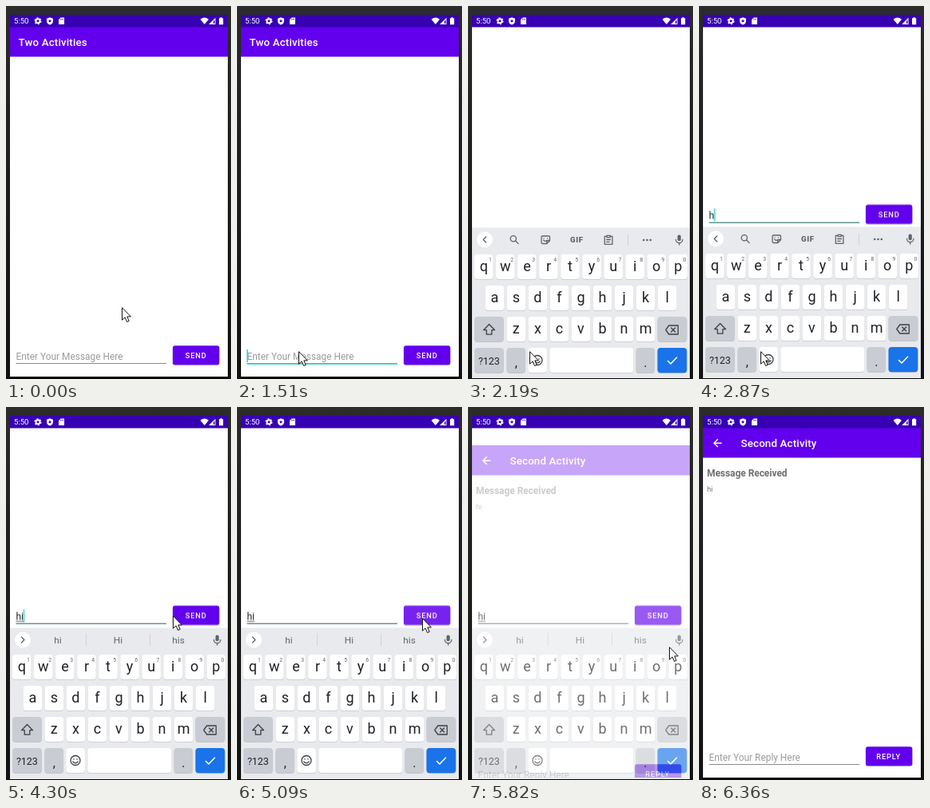
An HTML page for the animation above (8000 ms loop, 282x467 px).

```html
<!DOCTYPE html>
<html lang="en">
<head>
<meta charset="utf-8">
<title>Two Activities</title>
<style>
html, body { margin: 0; width: 100%; height: 100%; overflow: hidden; background: #1c1c1c; }
svg { display: block; width: 282px; height: 467px; font-family: Roboto, sans-serif; }
text { white-space: pre; }
.bar { fill: #6200ee; }
.title { font: 500 13.3px Roboto, sans-serif; letter-spacing: .166px; fill: #fff; }
.label { font: 500 9.3px Roboto, sans-serif; letter-spacing: .83px; fill: #fff; }
.entry { font-size: 11.9px; fill: #222; }
.hint { font-size: 11.9px; fill: #9b9b9b; }
.mid { text-anchor: middle; }
.icon { fill: none; stroke: #5f6368; stroke-width: 1.3; stroke-linecap: round; stroke-linejoin: round; }
.word { font-size: 11.8px; fill: #5f6368; text-anchor: middle; }
.split { stroke: #cfd2d6; }
.key { fill: #fff; }
.key.dim { fill: #c9ccd2; }
.key.go { fill: #1a73e8; }
.glyph { font-size: 18px; fill: #202124; text-anchor: middle; }
.digit { font-size: 6.8px; fill: #5f6368; text-anchor: middle; }

/* Hard steps; 1% of the loop is 80 ms. */
[data-run] { animation: 8s step-end -2ms infinite; }
#cursor { animation-name: cursor; }
#pan { animation-name: pan; }
#hint { animation-name: hint; }
#focus { animation-name: focus; }
#rest { animation-name: rest; }
#caret { animation-name: caret; }
#one { animation-name: one; }
#two { animation-name: two; }
#compose { animation-name: compose; }
#ripple { animation-name: ripple; }
#keyboard { animation-name: keyboard; }
#tools { animation-name: tools; }
#words { animation-name: words; }
#chevron { animation-name: chevron; transform-origin: 21px 291.5px; }
#second { animation-name: second; }

@keyframes cursor {
  0% { transform: translate(145px, 377px); }
  1.875% { transform: translate(-30px, 0); }
  5.25% { transform: translate(216px, 430px); }
  6.75% { transform: translate(86px, 427px); }
  8.625% { transform: translate(75px, 427px); }
  10.5% { transform: translate(74px, 430px); }
  12% { transform: translate(76px, 432px); }
  13.5% { transform: translate(77px, 432px); }
  50% { transform: translate(81px, 405px); }
  51.875% { transform: translate(104px, 349px); }
  53.75% { transform: translate(209px, 261px); }
  55.75% { transform: translate(236px, 252px); }
  57.25% { transform: translate(247px, 244px); }
  58.75% { transform: translate(240px, 258px); }
  60.25% { transform: translate(232px, 264px); }
  65.25% { transform: translate(228px, 274px); }
  67.125% { transform: translate(238px, 294px); }
  69% { transform: translate(246px, 380px); }
  70.75% { transform: translate(244px, 380px); }
  72.75% { transform: translate(252px, 300px); }
  74.375% { transform: translate(256px, 230px); }
  76.125% { transform: translate(255px, 192px); }
  77.875% { transform: translate(246px, 190px); }
  79.5%, 100% { transform: translate(-30px, 0); }
}
@keyframes pan {
  0% { transform: none; }
  25.5% { transform: translateY(-40px); }
  27.375% { transform: translateY(-110px); }
  30.5%, 100% { transform: translateY(-176.5px); }
}
@keyframes hint { 0% { opacity: 1; } 35.875%, 100% { opacity: 0; } }
@keyframes focus { 0% { opacity: 0; } 16.625% { opacity: 1; } 30.5%, 100% { opacity: 0; } }
@keyframes rest { 0% { stroke: #8c8c8c; } 30.5%, 100% { stroke: #62958f; } }
@keyframes caret {
  0% { opacity: 0; transform: none; }
  18.875% { opacity: 1; transform: none; }
  34% { opacity: 0; transform: none; }
  35.875% { opacity: 1; transform: translateX(6.6px); }
  37.375% { opacity: 1; transform: translateX(9.4px); }
  48.125% { opacity: 0; transform: translateX(9.4px); }
  53.75% { opacity: 1; transform: translateX(9.4px); }
  60.25%, 100% { opacity: 0; transform: translateX(9.4px); }
}
@keyframes one { 0% { opacity: 0; } 35.875% { opacity: 1; } 37.375%, 100% { opacity: 0; } }
@keyframes two { 0% { opacity: 0; } 37.375%, 100% { opacity: 1; } }
@keyframes compose { 0% { opacity: 0; } 41%, 100% { opacity: 1; } }
@keyframes ripple {
  0% { opacity: 0; }
  63.625% { opacity: .14; }
  65.25% { opacity: .24; }
  69% { opacity: .1; }
  70.75%, 100% { opacity: 0; }
}
@keyframes keyboard {
  0% { opacity: 0; transform: none; }
  25.5% { opacity: .6; transform: translateY(9px); }
  27.375% { opacity: 1; transform: translateY(1px); }
  30.5% { opacity: 1; transform: none; }
  74.375% { opacity: .5; transform: none; }
  76.125%, 100% { opacity: 0; transform: none; }
}
@keyframes tools { 0% { opacity: 1; } 37.375%, 100% { opacity: 0; } }
@keyframes words {
  0% { opacity: 0; }
  39% { opacity: .5; }
  41% { opacity: .8; }
  42.625%, 100% { opacity: 1; }
}
@keyframes chevron { 0% { transform: none; } 37.375%, 100% { transform: scaleX(-1); } }
@keyframes second {
  0% { opacity: 0; transform: none; }
  72.75% { opacity: .35; transform: translateY(22px); }
  74.375% { opacity: .85; transform: translateY(5px); }
  76.125%, 100% { opacity: 1; transform: none; }
}
</style>
</head>
<body>
<svg viewBox="0 0 282 467">
  <defs>
    <linearGradient id="desk" x2="0" y2="1">
      <stop stop-color="#2c2c2c"/><stop offset=".3" stop-color="#222"/><stop offset="1" stop-color="#121212"/>
    </linearGradient>
    <clipPath id="screen"><path d="M5 11H278V464H5Z"/></clipPath>
    <clipPath id="glass"><path d="M5 11H278V466H5Z"/></clipPath>
  </defs>
  <path fill="url(#desk)" d="M0 0H282V467H0Z"/>
  <path d="M5 464H278V467H5Z"/>

  <g clip-path="url(#screen)">
    <path fill="#fff" d="M5 11H278V464H5Z"/>
    <g id="pan" data-run>
      <path class="bar" d="M5 26H278V63.5H5Z"/>
      <text class="title" x="15.5" y="50">Two Activities</text>
      <text class="hint" id="hint" data-run x="12.5" y="443">Enter Your Message Here</text>
      <path id="rest" data-run stroke="#8c8c8c" d="M12.5 447.5H201"/>
      <path id="focus" data-run stroke="#1fcfbd" stroke-width="1.8" d="M12.5 447.8H201"/>
      <text class="entry" id="one" data-run x="12.5" y="443">h</text>
      <g id="two" data-run>
        <text class="entry" x="12.5" y="443">hi</text>
        <path id="compose" data-run stroke="#333" stroke-width=".9" d="M12.5 445H22"/>
      </g>
      <path id="caret" data-run stroke="#03cdb9" stroke-width="1.3" d="M13 430V446"/>
      <g data-button="SEND" data-x="224.8"></g>
      <rect id="ripple" data-run x="209" y="425.2" width="58.3" height="24" rx="2.7" fill="#fff"/>
    </g>
  </g>

  <g clip-path="url(#glass)">
    <g id="keyboard" data-run>
      <path fill="#e8eaed" d="M5 276.5H278V480H5Z"/>
      <circle cx="21" cy="291.5" r="10" fill="#fff"/>
      <path id="chevron" data-run class="icon" d="M22.6 288l-3.5 3.5 3.5 3.5"/>
      <g id="tools" data-run class="icon">
        <circle cx="56.8" cy="290.3" r="3.6"/><path d="M59.5 293l3.6 3.6"/>
        <path d="M93.5 287h7.5a1.5 1.5 0 0 1 1.5 1.5v4.3l-3.7 3.7h-5.3a1.5 1.5 0 0 1-1.5-1.5v-6.500a1.500 1.500 0 0 1 1.500-1.500ZM102.500 292.500h-2.200a1.500 1.500 0 0 0-1.500 1.500v2.500M95 289.800v.2M99.500 289.800v.2M94.700 292.300q2 2 4 .3"/>
        <text x="128" y="295.300" font-size="9.600" font-weight="900" letter-spacing=".6" fill="#5f6368" stroke="none">GIF</text>
        <path d="M173.800 287.300h-2.500v10h9.600v-10h-2.500M174 286.300h4.300v2.400H174ZM173.700 291.500h4.800M173.700 294.300h3.500"/>
        <path class="split" stroke-width="1" d="M200.500 285V299"/>
        <path stroke-width="2.600" d="M220.200 292h.01M224.500 292h.01M228.800 292h.01"/>
      </g>
      <g id="words" data-run>
        <path class="split" d="M100.500 283V299.500M180.500 283V299.500"/>
        <text class="word" x="65" y="296">hi</text>
        <text class="word" x="140.500" y="296">Hi</text>
        <text class="word" x="216" y="296">his</text>
      </g>
      <rect x="262.600" y="285.500" width="4.200" height="7.800" rx="2.100" fill="#5f6368"/>
      <path class="icon" d="M260.500 291.500a4.200 4.200 0 0 0 8.400 0M264.700 296v2"/>
      <g id="keys"></g>
      <g class="icon" style="stroke:#3c4043">
        <path d="M26.500 397.500l7 7.200h-3.700v5.500h-6.600v-5.500h-3.700Z"/>
        <path d="M251.800 399h11.500v11h-11.500l-4-5.500ZM254.700 402l5 5M259.700 402l-5 5"/>
        <circle cx="87" cy="442.500" r="6"/><path d="M85 440.700v.3M89 440.700v.3M83.800 444q3.200 3.700 6.400 0"/>
        <path stroke="#fff" stroke-width="1.600" d="M250.500 443.500l3.500 3.500 7.500-7.800"/>
      </g>
    </g>
  </g>

  <g clip-path="url(#screen)">
    <g id="second" data-run>
      <path fill="#fff" d="M5 26H278V464H5Z"/>
      <path class="bar" d="M5 26H278V63.500H5Z"/>
      <path fill="none" stroke="#fff" stroke-width="1.400" d="M28.500 45.200H19M23.700 40.300L18.800 45.200 23.700 50.100"/>
      <text class="title" x="52.500" y="50">Second Activity</text>
      <text x="10" y="87" font-size="11.900" font-weight="700" fill="#6f6f6f">Message Received</text>
      <text x="10" y="106" font-size="9.300" fill="#757575">hi</text>
      <text class="hint" x="12.500" y="443">Enter Your Reply Here</text>
      <path stroke="#8c8c8c" d="M12.500 447.500H201"/>
      <g data-button="REPLY" data-x="222.300"></g>
    </g>
    <path fill="#3700b3" d="M5 11H278V26.500H5Z"/>
    <g fill="#fff">
      <text x="10" y="22.300" font-size="9.600">5:50</text>
      <circle cx="40" cy="18.800" r="2.500" fill="none" stroke="#fff" stroke-width="1.900"/>
      <circle cx="40" cy="18.800" r="3.900" fill="none" stroke="#fff" stroke-width="1.300" stroke-dasharray="2.040"/>
      <path d="M55 14.200l4 1.600v3q0 3.400-4 4.800-4-1.400-4-4.800v-3Z"/>
      <circle cx="55" cy="18.700" r="1.500" fill="#3700b3"/>
      <path d="M68.700 14.500h4.300v8.600h-7v-6Z"/>
      <path stroke="#3700b3" stroke-width=".7" d="M68.600 15.800v1.700M70.100 15.800v1.700M71.600 15.800v1.700"/>
      <path d="M243.600 16.700q5.200-4.400 10.400 0l-5.200 6.400Z"/>
      <path d="M262.500 14.700v8.400h-8.400Z"/>
      <path fill="#3700b3" d="M261.500 17.300v4.800h-1.500v-3.300Z"/>
      <path d="M267 15.200h1.500v-1h2.200v1h1.500v8H267Z"/>
    </g>
  </g>

  <path id="cursor" data-run fill="#fff" stroke="#111" stroke-linejoin="round" d="M.5.700V16.200L4.100 12.900 6.600 18.500 9.200 17.400 6.800 11.900H11.400Z"/>
</svg>
<script>
const keys = document.getElementById('keys');
const STEP = 27.05, WIDE = 23.6;

const key = (x, y, w, kind = '') =>
  `<rect x="${x}" y="${y + .9}" width="${w}" height="31.2" rx="4" fill="#bfc2c7"/>` +
  `<rect class="key ${kind}" x="${x}" y="${y}" width="${w}" height="31.2" rx="4"/>`;
const glyph = (x, y, s, size = 18) =>
  `<text class="glyph" x="${x}" y="${y}" style="font-size:${size}px">${s}</text>`;

const row = (letters, left, y, digits = '') => [...letters].map((c, i) => {
  const x = left + i * STEP;
  const digit = digits ? `<text class="digit" x="${x + 20}" y="${y + 9}">${digits[i]}</text>` : '';
  return key(x, y, WIDE) + glyph(x + WIDE / 2, y + 21.3, c) + digit;
}).join('');

keys.innerHTML =
  row('qwertyuiop', 8, 310, '1234567890') +
  row('asdfghjkl', 21.5, 349) +
  key(8, 388, 36.800, 'dim') + row('zxcvbnm', 48.500, 388) + key(237.500, 388, 36.800, 'dim') +
  key(8, 427, 36.800, 'dim') + glyph(26.400, 447.500, '?123', 12.500) +
  key(48.500, 427, WIDE, 'dim') + glyph(60.300, 450.500, ',', 16) +
  key(75.300, 427, WIDE) + key(102.300, 427, 105) +
  key(210.500, 427, WIDE, 'dim') + glyph(222.300, 450.500, '.', 16) +
  key(237.500, 427, 36.800, 'go');

for (const b of document.querySelectorAll('[data-button]')) {
  b.innerHTML =
    '<rect x="208.7" y="426" width="58.900" height="24.300" rx="3" fill="#000" opacity=".22"/>' +
    '<rect class="bar" x="209" y="425.200" width="58.300" height="24" rx="2.700"/>' +
    `<text class="label" x="${b.dataset.x}" y="440.700">${b.dataset.button}</text>`;
}
</script>
</body>
</html>
```
